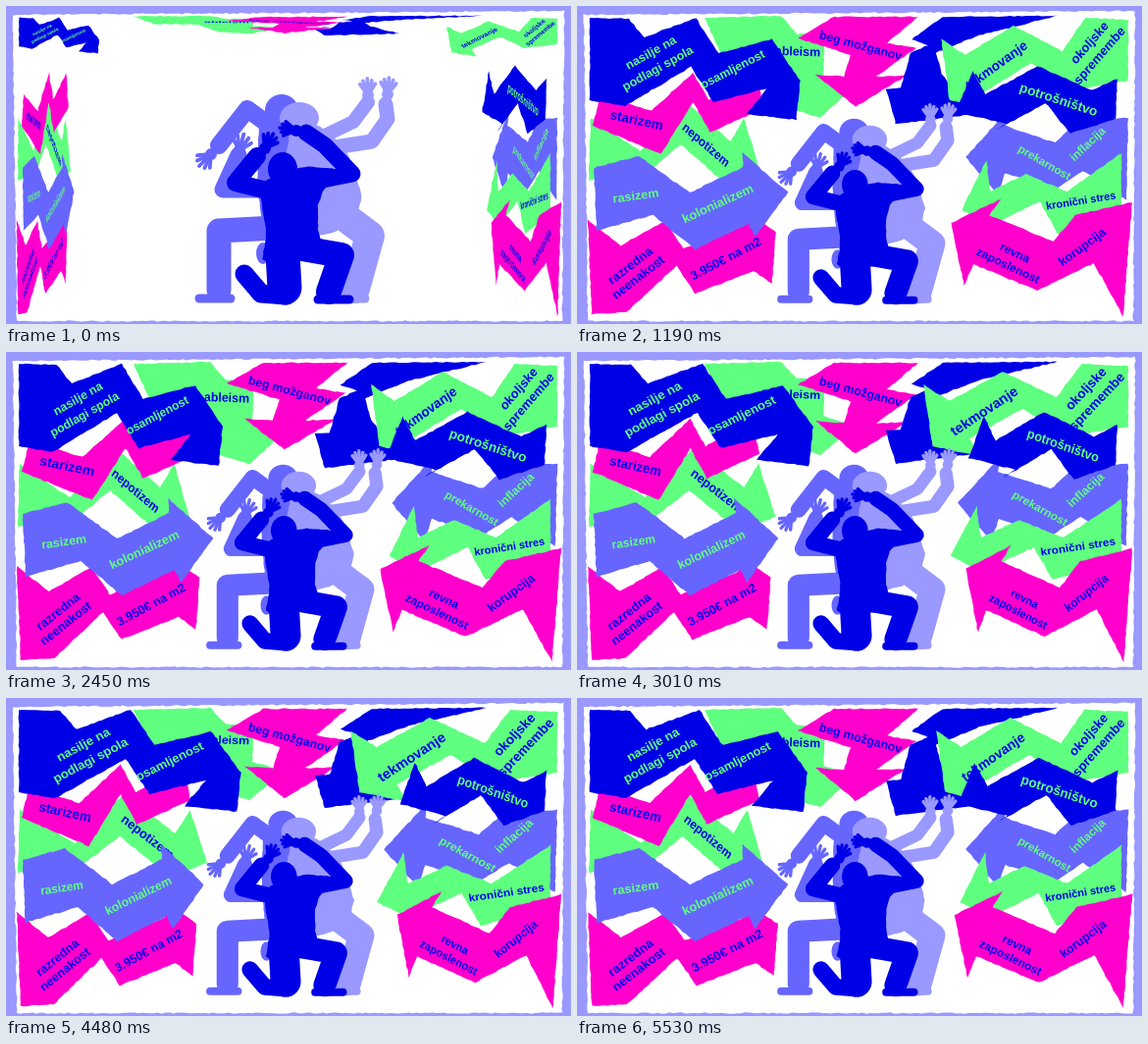
An HTML page with a canvas that plays this animation: 576 px wide and 324 px high, repeating every 5.6 s.

```html
<!DOCTYPE html>
<html lang="sl">
<head>
<meta charset="utf-8">
<style>
html, body { margin: 0; width: 100%; height: 100%; overflow: hidden; background: #99f; }
canvas { display: block; }
</style>
</head>
<body>
<canvas id="stage" width="576" height="324"></canvas>
<script>
const ctx = document.getElementById('stage').getContext('2d');
const LOOP = 5600, STEP = 70, GROW = 1050, SWAY = 1400;
const BLUE = '#0000e6', VIOLET = '#6666ff', LAVENDER = '#9999ff', PINK = '#ff00cc', GREEN = '#5fff7f';

// How far each group of arrows is folded, along x and y, when the loop begins.
const SIDES = {
  left: { fold: [0.27, 1] },
  right: { fold: [0.4, 1], fromRight: true },
  top: { fold: [1, 0.18], down: true },
  topLeft: { fold: [0.38, 0.35] },
  topRight: { fold: [0.55, 0.42], fromRight: true }
};
const arrows = [];
let tick = 0;

const lerp = (a, b, k) => a + (b - a) * k;
const smooth = k => k * k * (3 - 2 * k);
const pairs = list => Array.from({ length: list.length / 2 }, (_, i) => [list[2 * i], list[2 * i + 1]]);
const noise = n => {
  const v = Math.sin(n * 12.9898 + tick * 78.233) * 43758.5453;
  return v - Math.floor(v) - 0.5;
};

function fillRough(points, color, amount = 1) {
  let n = points.length * 7;
  ctx.fillStyle = color;
  ctx.beginPath();
  points.forEach(([x, y], i) => {
    const [u, v] = points[(i + 1) % points.length];
    const parts = Math.max(1, Math.round(Math.hypot(u - x, v - y) / 4));
    for (let j = 0; j < parts; j++) {
      ctx.lineTo(lerp(x, u, j / parts) + noise(n++) * amount, lerp(y, v, j / parts) + noise(n++) * amount);
    }
  });
  ctx.fill();
}

const label = (text, x, y, angle, size, color = BLUE) => ({ text, x, y, angle, size, color });

// A ribbon: one edge, the arrowhead, the same edge shifted back, then the tail.
function arrow(color, side, { edge, head, shift, tail, mid = 1, peak }, ...labels) {
  const front = pairs(edge);
  const back = front.slice(2).reverse().map(([x, y]) => [x + shift[0], y + shift[1]]);
  const points = [...front, ...pairs(head), ...back, ...pairs(tail)];
  const xs = points.map(p => p[0]), ys = points.map(p => p[1]);
  const { fold, fromRight, down } = SIDES[side];
  const anchor = [fromRight ? Math.max(...xs) : Math.min(...xs), Math.min(...ys)];
  arrows.push({ color, points, anchor, fold, down, mid, peak, labels });
}

arrow(PINK, 'left', { edge: [11, 218, 44, 244, 88, 219, 107, 247, 166, 224], head: [169, 209, 200, 230, 196, 283],
  shift: [12, 46], tail: [50, 312, 15, 314], mid: 0.97, peak: 0.95 },
  label('razredna', 54, 265, -38, 12.8), label('neenakost', 62, 277, -38, 12.8), label('3.950€ na m2', 150, 258, -28, 12.6));
arrow(GREEN, 'left', { edge: [14, 114, 72, 148, 124, 97, 177, 138], head: [193, 114, 211, 168, 165, 185],
  shift: [-5, 44], tail: [80, 170, 12, 178], mid: 0.93, peak: 0.32 },
  label('nepotizem', 148, 142, 37, 13.2));
arrow(VIOLET, 'left', { edge: [17, 165, 62, 153, 113, 190, 166, 164], head: [165, 149, 211, 190, 178, 235],
  shift: [5, 58], tail: [76, 213, 20, 229], mid: 0.97, peak: 0.9 },
  label('rasizem', 59, 194, -8, 12.4, GREEN), label('kolonializem', 141, 202, -25, 12.8, GREEN));
arrow(PINK, 'left', { edge: [24, 90, 76, 107, 119, 68, 135, 96], head: [184, 68, 192, 104, 136, 129],
  shift: [0, 30], tail: [86, 151, 16, 122], mid: 1.01, peak: 0.55 },
  label('starizem', 61, 117, 12, 13.7));
arrow(GREEN, 'top', { edge: [224, 28, 253, 28, 251, 69], head: [284, 79, 248, 111, 218, 102],
  shift: [-47, 7], tail: [196, 60, 150, 55, 130, 12, 208, 10], mid: 0.98, peak: 0.77 },
  label('ableism', 225, 46, 2, 12.4));
arrow(BLUE, 'topLeft', { edge: [53, 13, 69, 32, 122, 12, 145, 48, 200, 34], head: [229, 76, 225, 116, 174, 110],
  shift: [-5, 50], tail: [49, 102, 13, 96, 13, 12], peak: 0.12 },
  label('nasilje na', 76, 48, -29, 12.6, GREEN), label('podlagi spola', 83, 64, -29, 12.6, GREEN),
  label('osamljenost', 160, 65, -27, 12.4, GREEN));
arrow(PINK, 'top', { edge: [316, 38, 346, 43, 305, 72], head: [336, 71, 284, 103, 243, 70],
  shift: [-33, 0], tail: [279, 50, 225, 33, 262, 11, 348, 11], mid: 0.97, peak: 0.02 },
  label('beg možganov', 289, 41, 15, 12.4));
arrow(BLUE, 'top', { edge: [410, 30, 366, 48, 372, 70], head: [402, 111, 325, 121, 315, 85],
  shift: [-42, 14], tail: [340, 48, 358, 40, 341, 34, 373, 11, 490, 10], mid: 0.94, peak: 0.88 });
arrow(GREEN, 'topRight', { edge: [515, 12, 490, 46, 436, 20, 383, 50], head: [357, 33, 366, 96, 413, 106],
  shift: [20, 38], tail: [500, 86, 562, 76, 562, 14], mid: 0.98, peak: 0.28 },
  label('tekmovanje', 418, 61, -34, 14.2), label('okoljske', 520, 38, -47, 13.4), label('spremembe', 531, 51, -47, 13.4));
arrow(VIOLET, 'right', { edge: [562, 114, 512, 116, 487, 139, 436, 122], head: [437, 108, 396, 154, 429, 193],
  shift: [0, 48], tail: [516, 168, 560, 198], mid: 1.05, peak: 0.4 },
  label('prekarnost', 476, 160, 30, 11.6, GREEN), label('inflacija', 521, 141, -43, 12, GREEN));
arrow(BLUE, 'right', { edge: [551, 74, 525, 86, 470, 61, 417, 90], head: [404, 66, 387, 108, 438, 120],
  shift: [8, 38], tail: [503, 130, 549, 115], mid: 0.95, peak: 0.83 },
  label('potrošništvo', 491, 96, 18, 13.6, GREEN));
arrow(GREEN, 'right', { edge: [555, 150, 500, 189, 458, 171, 422, 189], head: [418, 157, 393, 208, 423, 224],
  shift: [14, 28], tail: [490, 232, 555, 212], mid: 1.06, peak: 0.35 },
  label('kronični stres', 514, 199, -9, 10.9));
arrow(PINK, 'right', { edge: [566, 200, 510, 213, 488, 240, 425, 213], head: [436, 197, 387, 221, 400, 285],
  shift: [-16, 50], tail: [528, 262, 557, 316], mid: 0.98, peak: 0.8 },
  label('revna', 450, 252, 26, 11.8), label('zaposlenost', 443, 265, 26, 11.8), label('korupcija', 517, 246, -37, 12.4));

function drawArrow({ color, points, anchor, fold, down, mid, peak, labels }, t, grown) {
  const reach = mid + 0.055 * Math.cos(2 * Math.PI * (t / SWAY - peak));
  const sx = lerp(fold[0], down ? 1 : reach, grown);
  const sy = lerp(fold[1], down ? reach : 1, grown);
  const dx = anchor[0] * (1 - sx), dy = anchor[1] * (1 - sy);
  fillRough(points.map(([x, y]) => [x * sx + dx, y * sy + dy]), color);
  for (const l of labels) {
    ctx.save();
    ctx.transform(sx, 0, 0, sy, dx, dy);
    ctx.translate(l.x, l.y);
    ctx.rotate(l.angle * Math.PI / 180);
    ctx.font = `bold ${l.size}px "Liberation Sans", Arial, sans-serif`;
    ctx.fillStyle = l.color;
    ctx.fillText(l.text, 0, 0);
    ctx.restore();
  }
}

function limb(color, width, ...joints) {
  ctx.strokeStyle = color;
  ctx.lineWidth = width;
  ctx.beginPath();
  pairs(joints).forEach(([x, y]) => ctx.lineTo(x, y));
  ctx.stroke();
}

function oval(color, x, y, rx, ry) {
  ctx.fillStyle = color;
  ctx.beginPath();
  ctx.ellipse(x, y, rx, ry, 0, 0, Math.PI * 2);
  ctx.fill();
}

// Corner cutting softens the outline.
function torso(color, ...outline) {
  const points = pairs(outline);
  fillRough(points.flatMap((p, i) => {
    const q = points[(i + 1) % points.length];
    return [0.2, 0.8].map(k => [lerp(p[0], q[0], k), lerp(p[1], q[1], k)]);
  }), color, 0.8);
}

function hand(color, x, y, angle, spread = 22) {
  oval(color, x, y, 6, 6);
  for (let finger = -2; finger <= 2; finger++) {
    const a = (angle + finger * spread) * Math.PI / 180;
    const length = 17 - Math.abs(finger) * 1.5;
    limb(color, 3.8, x, y, x + Math.cos(a) * length, y + Math.sin(a) * length);
  }
}

function drawFigures(scale) {
  ctx.save();
  ctx.translate(293.5, 305);
  ctx.scale(scale, scale);
  ctx.translate(-293.5, -305);
  ctx.lineCap = ctx.lineJoin = 'round';

  oval(VIOLET, 281, 106, 17, 16);
  torso(VIOLET, 258, 110, 302, 110, 300, 200, 266, 250, 260, 215, 256, 180);
  limb(VIOLET, 18, 268, 121, 246, 105, 217, 142);
  limb(VIOLET, 17, 262, 187, 221, 187, 237, 152);
  limb(VIOLET, 25, 275, 226, 217, 229, 217, 289);
  limb(VIOLET, 9, 197, 298, 229, 298);
  oval(VIOLET, 262, 252, 7, 11);
  hand(VIOLET, 209, 151, 135, 20);
  hand(VIOLET, 238, 147, 285);

  oval(LAVENDER, 299, 114, 20, 16);
  torso(LAVENDER, 284, 112, 322, 122, 350, 150, 366, 204, 330, 236, 285, 225, 266, 195, 290, 140);
  limb(LAVENDER, 14, 325, 132, 354, 118, 369, 98);
  limb(LAVENDER, 15, 335, 144, 373, 138, 389, 115, 387, 100);
  limb(LAVENDER, 30, 335, 207, 371, 234, 356, 288);
  limb(LAVENDER, 9, 349, 298, 366, 298);
  hand(LAVENDER, 369, 91, 268, 17);
  hand(LAVENDER, 389, 90, 275, 17);

  torso(BLUE, 258, 180, 300, 163, 342, 166, 318, 195, 318, 236, 334, 257, 300, 260, 260, 264, 266, 232, 261, 205);
  limb(BLUE, 18, 270, 189, 234, 180, 256, 153);
  limb(BLUE, 17, 318, 178, 353, 171, 325, 142, 306, 129);
  limb(BLUE, 35, 282, 252, 284, 287);
  limb(BLUE, 19, 286, 295, 260, 293, 243, 273);
  limb(BLUE, 26, 302, 247, 342, 254, 329, 291);
  limb(BLUE, 9, 318, 299, 350, 299);
  oval(BLUE, 282, 166, 15, 17);
  hand(BLUE, 264, 145, 300, 18);
  hand(BLUE, 296, 127, 190, 15);
  ctx.restore();
}

function draw(now) {
  tick = Math.floor((now % LOOP) / STEP);
  const t = tick * STEP;
  const grown = smooth(Math.min(1, t / GROW));
  ctx.fillStyle = LAVENDER;
  ctx.fillRect(0, 0, 576, 324);
  fillRough(pairs([7, 9, 300, 7, 569, 5, 567, 321, 11, 321]), '#fff', 1.4);
  ctx.textAlign = 'center';
  ctx.textBaseline = 'middle';
  arrows.forEach(a => drawArrow(a, t, grown));
  drawFigures(lerp(1, 0.885, grown));
}

const begin = performance.now();
function loop() {
  draw(performance.now() - begin);
  requestAnimationFrame(loop);
}
loop();
</script>
</body>
</html>
```
